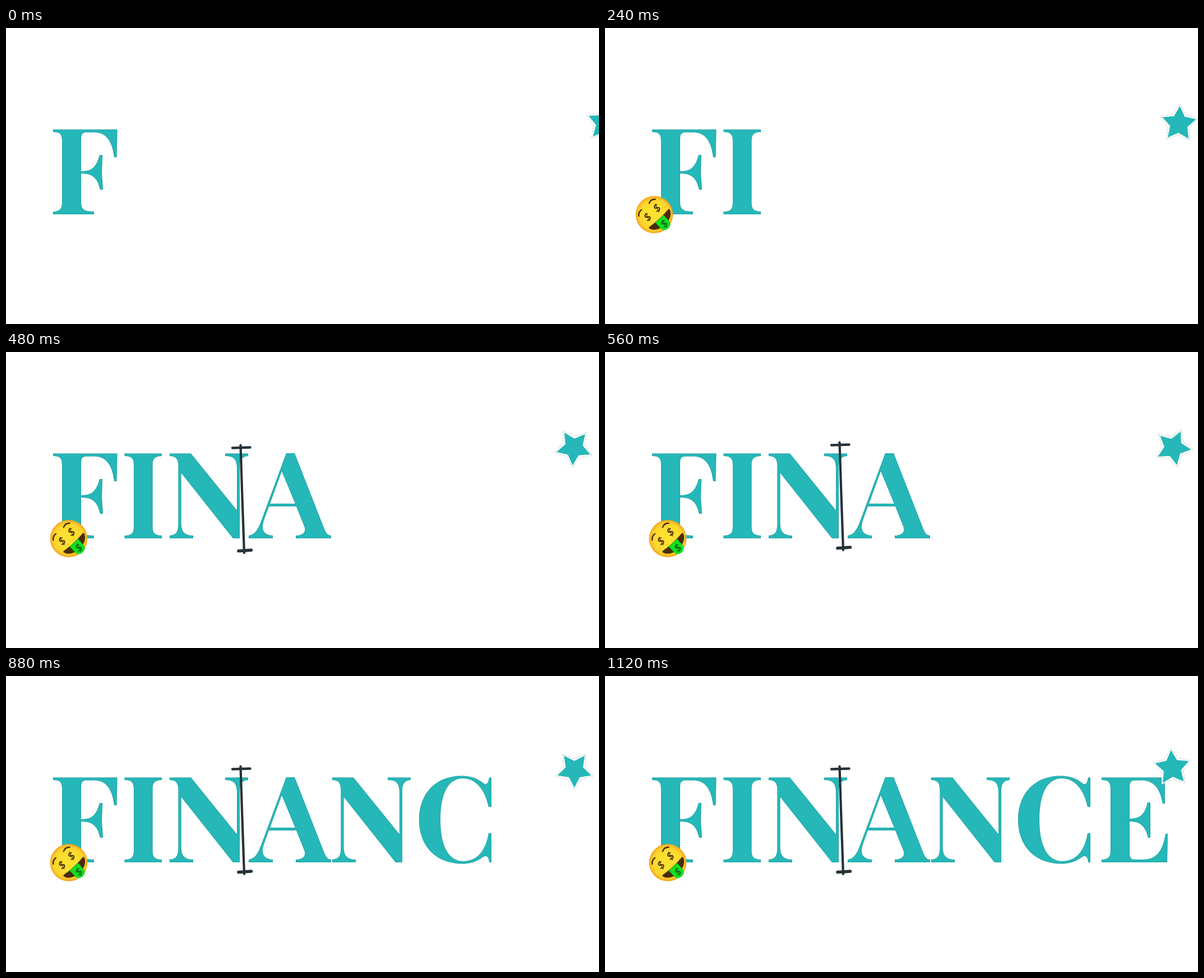
These frames come from a looping animation (1058 by 529 pixels, 1200 ms). An HTML page with a canvas:

```html
<!DOCTYPE html>
<html lang="en">
<head>
<meta charset="utf-8">
<title>Finance</title>
<style>
  html, body { margin: 0; width: 100%; height: 100%; overflow: hidden; background: #fff; }
  canvas { display: block; }
</style>
</head>
<body>
<canvas id="stage" width="1058" height="529" role="img" aria-label="FINANCE"></canvas>
<script>
const ctx = document.getElementById('stage').getContext('2d');
const STEP = 80, STEPS = 15;
const TEAL = '#26b7b8', INK = '#263238', BROWN = '#4a2c0a';

// Letter outlines, in stage coordinates
const F = 'M84 181.6H198.5L197.5 231H193C190 205 181 187 158 186.5H143C136 187 134 190 134 199V256' +
  'C152 256 161 250 167 227H172L171 260L173 289H168C163 268 155 260 134 260V311' +
  'C134 324 139 328 157 328V333H84V328C97 328 100 322 100 311V202C100 190 97 186 84 186Z';
const I = 'M211.5 181.6H278V186C265 186 261.5 191 261.5 202V312C261.5 323 265 328 278 328V333H211.5V328' +
  'C225 328 228 323 228 312V202C228 191 225 186 211.5 186Z';
const N = 'M292 181.6H330L412 283V205C411 190 405 186 391 186V181.6H432V186C421 187 417 192 417 206' +
  'V333H405L312.5 216V306C313 322 319 328 334 328V333H292V328C304 327 307.5 322 307.5 304V204' +
  'C307.5 192 304 186 292 186Z';
const A = 'M500 181H515L567 314C571 324 574 328 580 328V333H517V328C531 328 536 321 532 311' +
  'L518 276H469L460 301C455 317 459 327 476 328V333H433V328C444 327 450 317 456 300Z' +
  'M492 213L516 271H471Z';
const C = 'M866 181.6V234H861C855 203 838 183 815 183C788 183 775 212 775 257C775 303 789 331 816 331' +
  'C841 331 856 312 861 281H866V333H862C862 326 859 321 854 322C847 325 838 335.5 814 335.5' +
  'C768 335.5 737 305 737 257C737 209 768 178.5 812 178.5C838 178.5 847 189 854 193C859 195 861 189 862 181.6Z';
const E = 'M886 181.6H999V228H995C991 205 982 187 958 186.5H945C938 187 936 190 936 199V255' +
  'C953 255 963 249 968 226H973V289H969C964 268 955 260 936 260V315C936 325 938 328 946 328H960' +
  'C984 328 995 313 1000 282H1004L1003 333H886V328C899 328 902 322 902 311V202C902 190 899 186 886 186Z';
const word = [[F, 0], [I, 0], [N, 0], [A, 0], [N, 290], [C, 0], [E, 0]]
  .map(([d, dx]) => ({ path: new Path2D(d), dx }));

// Keys are [step, value, ...]
const starKeys = [
  [0, 1068.5, 170, 78], [2, 1037, 171, 78.5], [4, 1011, 171, 72], [7, 1014, 171, 24],
  [9, 1014, 168, -4], [11, 1014, 168, -36], [14, 1012, 164, -76]
];
const faceKeys = [[0, -150], [1, -105], [2, -64], [3, -24], [4, 0]];
const cursorKeys = [[4, 60, 0], [5, 22, 0.6], [6, 5, 1], [7, 0, 1]];

function sample(keys, k) {
  const n = keys.findIndex(key => key[0] >= k);
  if (n < 0) return keys[keys.length - 1].slice(1);
  if (n === 0) return keys[0].slice(1);
  const a = keys[n - 1], b = keys[n], u = (k - a[0]) / (b[0] - a[0]);
  return a.slice(1).map((v, i) => v + (b[i + 1] - v) * u);
}

function place(x, y, degrees, draw) {
  ctx.save();
  ctx.translate(x, y);
  ctx.rotate(degrees * Math.PI / 180);
  draw();
  ctx.restore();
}

function stroke(d, color, width) {
  ctx.strokeStyle = color;
  ctx.lineWidth = width;
  ctx.stroke(new Path2D(d));
}

function fill(d, color) {
  ctx.fillStyle = color;
  ctx.fill(new Path2D(d));
}

function drawWord(count) {
  for (const { path, dx } of word.slice(0, count)) {
    place(dx, 0, 0, () => {
      ctx.fillStyle = TEAL;
      ctx.fill(path, 'evenodd');
      // Thin dark rim, kept inside the letter
      ctx.clip(path, 'evenodd');
      ctx.strokeStyle = 'rgba(18,112,114,.45)';
      ctx.lineWidth = 1.2;
      ctx.stroke(path);
    });
  }
}

function dollar(x, y, size, color) {
  place(x, y, 10, () => {
    ctx.fillStyle = color;
    ctx.font = `bold ${size}px Lato, sans-serif`;
    ctx.textAlign = 'center';
    ctx.textBaseline = 'alphabetic';
    ctx.fillText('$', 0, size * 0.36);
  });
}

function drawFace(dx) {
  place(112 + dx, 333.5, -43, () => {
    const skin = ctx.createRadialGradient(0, 0, 14, 0, 0, 33.5);
    skin.addColorStop(0, '#fee02f');
    skin.addColorStop(0.65, '#fdd52f');
    skin.addColorStop(0.88, '#f9b822');
    skin.addColorStop(1, '#f09a1c');
    ctx.fillStyle = skin;
    ctx.beginPath();
    ctx.arc(0, 0, 33.3, 0, Math.PI * 2);
    ctx.fill();

    ctx.lineCap = 'round';
    stroke('M7 -21Q14 -25 20 -19M-22 -17Q-18 -23 -11 -22', BROWN, 2.4);
    dollar(11.5, -5.5, 18, BROWN);
    dollar(-11.8, -5, 18, BROWN);

    fill('M-22 10Q2 13 25 10Q27 10 26 13C20 30 -16 32 -23 13Q-24 10 -22 10Z', BROWN);
    fill('M-8.5 11.5Q2 12.5 11.5 11.5V26C11.5 38 -8.5 38 -8.5 26Z', '#0ee01f');
    dollar(1.8, 24, 17, '#0b5a18');
  });
}

function drawCursor(dy, alpha) {
  ctx.save();
  ctx.globalAlpha = alpha;
  ctx.translate(0, dy);
  ctx.lineCap = 'round';
  stroke('M418.5 161.5L421 240L425 354', INK, 4.2);
  stroke('M404 166.5L419 166L435.5 165.5', INK, 4.4);
  stroke('M415 350.5L425 350L437.5 349', INK, 5.6);
  ctx.restore();
}

function starPath(outer, inner) {
  ctx.beginPath();
  for (let i = 0; i < 10; i++) {
    const r = i % 2 ? inner : outer, a = i * Math.PI / 5;
    ctx.lineTo(r * Math.sin(a), -r * Math.cos(a));
  }
  ctx.closePath();
}

function drawStar(x, y, turn) {
  place(x, y, turn, () => {
    ctx.lineJoin = 'round';
    starPath(35.5, 20.5);
    ctx.fillStyle = '#fff';
    ctx.fill();
    ctx.setLineDash([3, 2]);
    ctx.strokeStyle = '#b9b9b9';
    ctx.lineWidth = 0.8;
    ctx.stroke();
    starPath(31.8, 16.2);
    ctx.fillStyle = TEAL;
    ctx.fill();
  });
}

function frame(now) {
  const k = Math.floor(now / STEP) % STEPS;
  ctx.fillStyle = '#fff';
  ctx.fillRect(0, 0, 1058, 529);
  drawWord(Math.floor(k / 2) + 1);
  drawFace(...sample(faceKeys, k));
  drawCursor(...sample(cursorKeys, k));
  drawStar(...sample(starKeys, k));
}

const start = performance.now();
function tick() {
  frame(performance.now() - start);
  requestAnimationFrame(tick);
}
tick();
</script>
</body>
</html>
```
